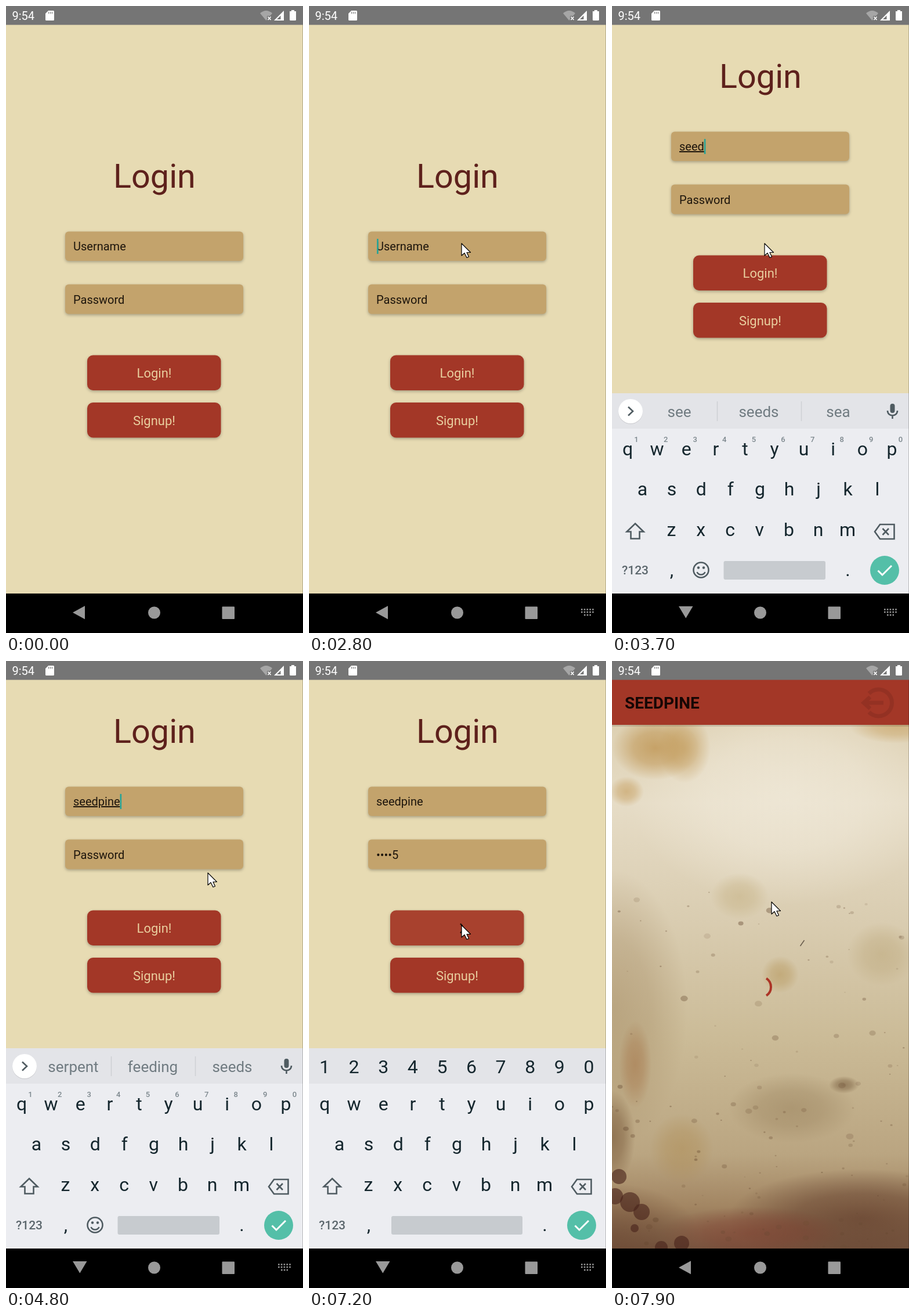
An HTML page that plays this animation: 512 by 1080 pixels, repeating every 8000 ms.

```html
<!DOCTYPE html>
<html lang="en">
<head>
<meta charset="utf-8">
<title>Login flow</title>
<style>
html, body { margin: 0; width: 100%; height: 100%; overflow: hidden; background: #000; }
svg { display: block; font-family: Roboto, sans-serif; }
.mid { text-anchor: middle; }
.card { fill: #c3a36c; filter: drop-shadow(0 2px 2.5px rgba(0,0,0,.28)); }
.btn { fill: #a33727; filter: drop-shadow(0 2px 2.5px rgba(0,0,0,.28)); }
.label { font-size: 22px; fill: #e9cf9f; }
.input { font-size: 20px; fill: #1d150c; }
.key { font-size: 32px; fill: #14262d; }
.sup { font-size: 13px; font-weight: 500; fill: #7c878d; }
.hint { font-size: 26px; fill: #707b81; }
.icon { fill: none; stroke: #4f5b61; stroke-width: 2.6; }
</style>
</head>
<body>
<svg id="stage" width="512" height="1080" viewBox="0 0 512 1080">
  <defs><clipPath id="app"><rect y="32" width="512" height="980"/></clipPath></defs>
  <g clip-path="url(#app)">
    <rect y="32" width="512" height="980" fill="#e7dbb3"/>
    <g id="form">
      <text class="mid" x="256" y="313" font-size="57.5" fill="#5e211c">Login</text>
      <rect class="card" x="102" y="388.5" width="307" height="50.5" rx="6"/>
      <rect class="card" x="102" y="479.5" width="307" height="51" rx="6"/>
      <text class="input" id="user" x="116" y="421"></text>
      <text class="input" id="pass" x="116" y="512.5"></text>
      <rect id="caret" width="2.6" height="26" fill="#26a497"/>
      <rect class="btn" id="loginBtn" x="140" y="601.5" width="230.500" height="60.500" rx="10"/>
      <text class="label mid" id="loginText" x="255.500" y="640">Login!</text>
      <path id="busy" fill="none" stroke="#1b0d09" stroke-width="2.4"/>
      <rect class="btn" x="140" y="683" width="230.500" height="60.500" rx="10"/>
      <text class="label mid" x="255.500" y="721.500">Signup!</text>
    </g>

    <g id="board">
      <rect y="667" width="512" height="345" fill="#ecedf1"/>
      <rect y="667" width="512" height="61" fill="#e3e4e8"/>
      <g id="keys"></g>
      <g id="words">
        <circle cx="32" cy="699" r="21" fill="#000" opacity=".12"/>
        <circle cx="32" cy="698" r="21" fill="#fff"/>
        <path class="icon" d="M28 690.500l8 7.500-8 7.500"/>
        <path d="M181.500 681v34M326.500 681v34" stroke="#cdd0d4" stroke-width="1.500"/>
        <rect x="479.500" y="685" width="8" height="16" rx="4" fill="#4f5b61"/>
        <path class="icon" d="M475 697c0 11 17 11 17 0M483.500 705v6" stroke-width="2"/>
        <g id="hints"></g>
        <g id="sups"></g>
        <circle class="icon" cx="153.500" cy="971.500" r="13"/>
        <path class="icon" d="M146.500 975c3 6 11 6 14 0"/>
        <circle cx="149" cy="967.500" r="2.200" fill="#4f5b61"/>
        <circle cx="158" cy="967.500" r="2.200" fill="#4f5b61"/>
      </g>
      <g id="digits"></g>
      <rect id="space" y="956" height="32" rx="3" fill="#c7cbcf"/>
      <path class="icon" d="M40 891.500l14.500 14h-7v12h-15v-12h-7z"/>
      <path class="icon" d="M462 893h24.500v25H462l-9-12.500zM466.500 900l10.500 11m0-11l-10.500 11"/>
      <text class="mid" x="40" y="979" font-size="21" font-weight="500" fill="#5b666c">?123</text>
      <circle cx="470" cy="972" r="25" fill="#54bfa8"/>
      <path d="M458.500 972.500l7.500 7.500 16-16" fill="none" stroke="#fff" stroke-width="3"/>
    </g>

    <g id="home">
      <g id="paper"></g>
      <rect y="110" width="512" height="3" opacity=".12"/>
      <rect y="32" width="512" height="78" fill="#a33727"/>
      <text id="title" x="22" y="82" font-size="28" font-weight="700" fill="#170705"></text>
      <path id="exit" d="M443 56a23 23 0 1 1 0 32M468 72h-34m11-10l-11 10 11 10" fill="none" stroke="#1b0806" stroke-width="7"/>
      <path id="load" fill="none" stroke="#ac3426" stroke-width="4"/>
    </g>
    <rect x="511" y="32" width="1" height="980" opacity=".22"/>
  </g>

  <rect width="512" height="32.500" fill="#757575"/>
  <text x="10.500" y="23.500" font-size="20" fill="#fff">9:54</text>
  <path d="M73 8h8.500q1.500 0 1.500 1.500v14q0 1.500-1.500 1.500h-12q-1.500 0-1.500-1.500V13z" fill="#fff"/>
  <path d="M73.500 10v3.500m3-3.500v3.500m3-3.500v3.500" stroke="#888" stroke-width="1.300"/>
  <path d="M438 12.500q10.500-9 21 0L448.500 25z" fill="#fff" opacity=".36"/>
  <rect x="450" y="17" width="8" height="9" fill="#757575"/>
  <path d="M451.500 18.500l5 5.500m0-5.500l-5 5.500" stroke="#fff" stroke-width="1.700"/>
  <path d="M479 8v17h-17z" fill="#fff"/><path d="M473.500 16.500V23h-6.500z" fill="#757575"/>
  <path d="M492 7h5v2h3v14.500q0 1.500-1.500 1.500h-8q-1.500 0-1.500-1.500V9h3z" fill="#fff"/>

  <rect y="1012" width="512" height="68"/>
  <g fill="#999">
    <path id="back"/>
    <circle cx="255.500" cy="1045" r="10.500"/>
    <rect x="372.500" y="1034.500" width="21.500" height="21.500" rx="1"/>
    <path id="ime" d="M469 1039.500h22M469 1044h22M474 1049h12" stroke="#999" stroke-width="2.600" stroke-dasharray="2.600 2.200"/>
  </g>
  <path id="mouse" d="M0 0V21L5 16.500 9 24.500 12.500 23 9 15.500H15.500Z" fill="#fff" stroke="#000" stroke-width="1.200" stroke-linejoin="round"/>
</svg>
<script>
const LOOP = 8000, STEP = 100, LIFT = -172, NAME = 'seedpine';
const $ = id => document.getElementById(id);
const show = (id, on) => $(id).style.display = on ? '' : 'none';
const put = (id, attrs) => { for (const k in attrs) $(id).setAttribute(k, attrs[k]); };

function add(parent, tag, attrs, text) {
  const el = document.createElementNS('http://www.w3.org/2000/svg', tag);
  for (const k in attrs) el.setAttribute(k, attrs[k]);
  if (text) el.textContent = text;
  return parent.appendChild(el);
}

// Keyboard
function row(id, chars, x, y, cls) {
  [...chars].forEach((c, i) => add($(id), 'text', { x: x + i * 50.6, y, class: cls + ' mid' }, c));
}
row('keys', 'qwertyuiop', 27, 774, 'key');
row('keys', 'asdfghjkl', 52.5, 843, 'key');
row('keys', 'zxcvbnm', 102.5, 913, 'key');
row('keys', ',', 103, 982, 'key');
row('keys', '.', 406.5, 982, 'key');
row('digits', '1234567890', 27, 710, 'key');
row('sups', '1234567890', 42, 751, 'sup');
const hintEls = [116, 253, 390].map(x => add($('hints'), 'text', { x, y: 708, class: 'hint mid' }));
const HINTS = [['', '', ''], ['so', 'she', 'see'], ['see', 'set', 'self'], ['see', 'seen', 'seem'],
  ['see', 'seeds', 'sea'], ['seed', 'seeds', 'seedy'], ['seeding', 'seed', 'speeding'],
  ['seeing', 'seeding', 'sewing'], ['serpent', 'feeding', 'seeds']];

// Aged paper: soft stains over a vertical gradient
function gradient(id, tag, stops) {
  const g = add(document.querySelector('defs'), tag, { id });
  if (tag === 'linearGradient') { g.setAttribute('x2', 0); g.setAttribute('y2', 1); }
  stops.forEach(([offset, color, alpha = 1]) =>
    add(g, 'stop', { offset, 'stop-color': color, 'stop-opacity': alpha }));
  return `url(#${id})`;
}
const STAINS = [
  [300, 230, 270, 190, '#f0e9d9', .75], [75, 150, 75, 55, '#bd914c', .75], [125, 150, 45, 60, '#c29a58', .6],
  [25, 225, 30, 26, '#c59c5b', .6], [490, 112, 80, 30, '#c7a060', .6], [0, 600, 130, 240, '#a48a63', .5],
  [220, 405, 50, 40, '#c5b183', .55], [290, 540, 32, 32, '#b89a60', .6], [465, 505, 60, 55, '#b8a273', .45],
  [40, 695, 28, 75, '#a26c3e', .45], [310, 770, 110, 60, '#8e7550', .4], [400, 730, 26, 15, '#755a3c', .6],
  [0, 820, 40, 80, '#735233', .6], [120, 840, 55, 60, '#ae8b50', .45], [430, 960, 230, 85, '#64402e', .75],
  [240, 985, 160, 45, '#81392c', .5], [0, 990, 150, 90, '#68442f', .55]
];
function drawPaper() {
  const paper = $('paper');
  const fill = gradient('base', 'linearGradient',
    [[0, '#ddd0b2'], [.15, '#e6dcc6'], [.38, '#d9ccb0'], [.6, '#cbbb97'], [.82, '#baa581'], [.92, '#a28562'], [1, '#775842']]);
  add(paper, 'rect', { y: 110, width: 512, height: 902, fill });
  STAINS.forEach(([cx, cy, rx, ry, color, a], i) => add(paper, 'ellipse', { cx, cy, rx, ry,
    fill: gradient('stain' + i, 'radialGradient', [[0, color, a], [.5, color, a * .7], [1, color, 0]]) }));
  let seed = 11;
  const rnd = () => (seed = seed * 16807 % 2147483647) / 2147483647;
  for (let i = 0; i < 130; i++) {
    const r = 1 + 4 * rnd() ** 3;
    add(paper, 'ellipse', { cx: rnd() * 512, cy: 1010 - 620 * rnd() ** 1.4, rx: r * 1.3, ry: r,
      fill: '#664931', opacity: .12 + .3 * rnd() });
  }
  [[12, 888, 13], [5, 922, 14], [31, 932, 17], [51, 949, 14], [39, 977, 7], [120, 1003, 13], [85, 1010, 11]]
    .forEach(([cx, cy, r]) => add(paper, 'circle', { cx, cy, r, fill: '#48231b', opacity: .62 }));
  add(paper, 'path', { d: 'M324.500 491l7-10', stroke: '#685c4c', 'stroke-width': 1.5 });
}
drawPaper();
$('title').textContent = NAME.toUpperCase();

// Timeline: [time, x, y] for the pointer, key times for typing
const PATH = [[600, 500, 930], [900, 362, 820], [1300, 341, 680], [1700, 323, 566], [1800, 280, 432],
  [1900, 263, 409], [4600, 263, 409], [4800, 348, 365], [5100, 248, 333], [6500, 248, 333],
  [6900, 263, 455], [7400, 263, 455], [7700, 275, 415], [8000, 275, 415]];
const USER_KEYS = [3300, 3400, 3500, 3600, 3900, 4100, 4200, 4400];
const PASS_KEYS = [5600, 5700, 5900, 6100, 6300];
const FOCUS = 2700, SWITCH = 5300, PRESS = 7000, CLOSE = 7600, HOME = 7700;

const typed = (keys, t) => keys.filter(k => k <= t).length;
const clamp = v => Math.max(0, Math.min(1, v));

function pointer(t) {
  const i = PATH.findIndex(p => p[0] > t);
  const [t0, x0, y0] = PATH[i - 1], [t1, x1, y1] = PATH[i], k = (t - t0) / (t1 - t0);
  return [x0 + (x1 - x0) * k, y0 + (y1 - y0) * k];
}

function arc(cx, cy, r, dt) {
  const a = (-90 + .17 * dt) * Math.PI / 180, len = Math.min(270, .56 * dt), b = a + len * Math.PI / 180;
  const at = v => `${cx + r * Math.cos(v)} ${cy + r * Math.sin(v)}`;
  return `M${at(a)}A${r} ${r} 0 ${+(len > 180)} 1 ${at(b)}`;
}

function render(t) {
  const up = t >= 3000 && t < CLOSE, inPass = t >= SWITCH;
  const nUser = typed(USER_KEYS, t), nPass = typed(PASS_KEYS, t);

  put('form', { transform: `translate(0 ${up ? LIFT : 0})` });
  $('user').textContent = nUser ? NAME.slice(0, nUser) : 'Username';
  $('user').style.textDecoration = nUser && !inPass ? 'underline' : 'none';
  $('pass').textContent = nPass ? '•'.repeat(nPass - 1) + nPass : 'Password';

  const last = Math.max(...[FOCUS, SWITCH, ...USER_KEYS, ...PASS_KEYS].filter(k => k <= t), 0);
  show('caret', last && (t - last) % 1000 < 500 && t < CLOSE);
  const field = $(inPass ? 'pass' : 'user'), n = inPass ? nPass : nUser;
  put('caret', { x: n ? 116 + field.getComputedTextLength() : 117, y: inPass ? 492 : 401 });

  const busy = t > PRESS;
  put('loginBtn', { style: t >= PRESS ? 'fill:#a8412e' : '' });
  show('loginText', !busy);
  put('busy', { d: busy ? arc(255.5, 632.5, 9.5, t - PRESS) : '' });

  const raise = clamp((t - 2800) / 300) - clamp((t - CLOSE + 100) / 200);
  show('board', raise > 0);
  put('board', { transform: `translate(0 ${345 * (1 - raise) ** 2})` });
  const numeric = t >= SWITCH + 100;
  show('words', !numeric);
  show('digits', numeric);
  put('space', numeric ? { x: 142, width: 226 } : { x: 192.5, width: 175.5 });
  hintEls.forEach((el, i) => el.textContent = HINTS[nUser][i]);

  show('home', t >= HOME);
  put('exit', { opacity: clamp((t - 7850) / 500) });
  put('load', { d: t > HOME ? arc(256, 561.5, 18, t - HOME) : '' });

  put('back', { d: up ? 'M115 1034h24.500l-12.200 20.500z' : 'M115 1044.800l21-11.500v23z' });
  show('ime', t >= FOCUS && t < CLOSE);

  const visible = t >= PATH[0][0];
  show('mouse', visible);
  if (visible) put('mouse', { transform: `translate(${pointer(t)})` });
}

function tick() {
  render(Math.floor(performance.now() % LOOP / STEP) * STEP);
  requestAnimationFrame(tick);
}
tick();
</script>
</body>
</html>
```
